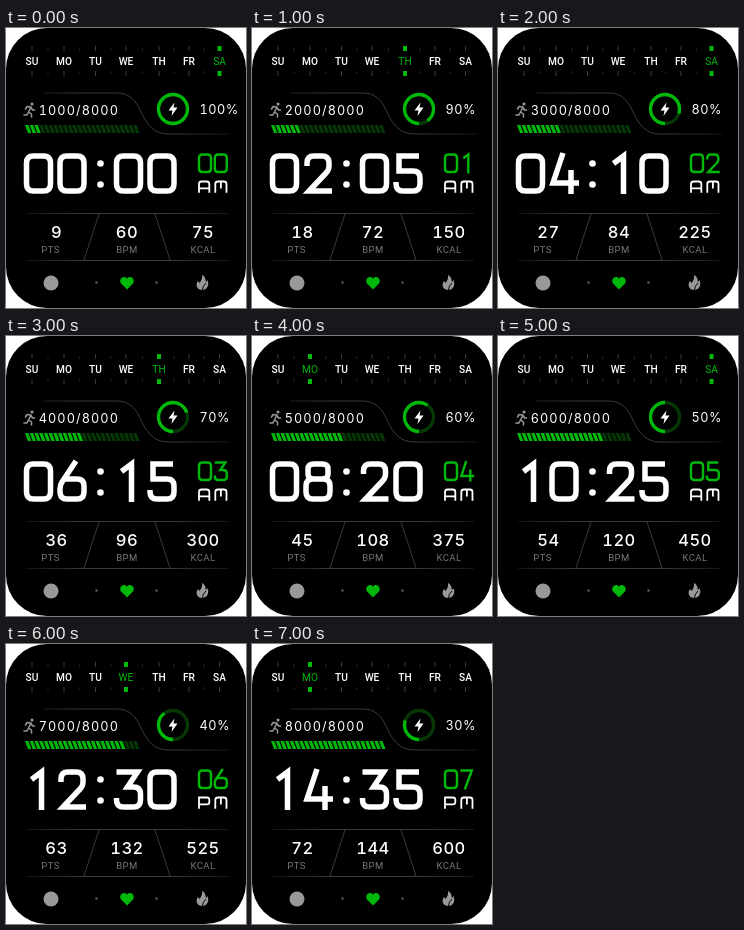
An HTML page that plays this animation: 240 px wide and 280 px high, repeating every 8 s.

```html
<!DOCTYPE html>
<html lang="en">
<head>
<meta charset="utf-8">
<title>Watch face</title>
<style>
  html, body { margin: 0; width: 100%; height: 100%; overflow: hidden; background: #fff; }
  svg { display: block; width: 240px; height: 280px; --green: #00b80a; --dim: #063806; }
  text { fill: #fff; font: 500 10.2px Roboto, sans-serif; }
  .mid text { text-anchor: middle; }
  .value text { font: 500 16.5px Inter, sans-serif; font-variant-numeric: tabular-nums; letter-spacing: .5px; }
  .small { font: 400 12.7px Inter, sans-serif; font-variant-numeric: tabular-nums; letter-spacing: 1.1px; }
  .unit text { fill: #777; font-size: 9.5px; font-weight: 400; letter-spacing: .4px; }
  .lines { fill: none; stroke: url(#fade); }
  .glyphs { fill: none; }
  .day rect { fill: #3c3c3c; }
  .day.on * { fill: var(--green); font-weight: 400; }
</style>
</head>
<body>
<svg viewBox="0 0 240 280">
  <defs>
    <linearGradient id="fade" gradientUnits="userSpaceOnUse" x1="18" x2="224" y1="0" y2="0">
      <stop stop-color="#111"/><stop offset=".3" stop-color="#3a3a3a"/>
      <stop offset=".7" stop-color="#3a3a3a"/><stop offset="1" stop-color="#161616"/>
    </linearGradient>
  </defs>
  <rect width="240" height="280" rx="41"/>
  <g id="days" class="mid"></g>

  <g class="lines">
    <path d="M38 65H111C124 65 130 73 135 84S147 106 162 106H224"/>
    <path d="M20 185.500H222M20 232.500H222M93 186L78 232M149 186L164 232"/>
  </g>

  <g fill="none" stroke="#999" stroke-width="1.500" stroke-linecap="round" stroke-linejoin="round">
    <path d="M19.500 81L21 78.500L25 79L22.500 84L25.500 86V89M22.500 84L21 87H18M25 79.500L26.500 82H28.500"/>
    <circle cx="26" cy="76" r=".8" fill="#999"/>
  </g>
  <text id="steps" class="small" x="32.700" y="86.500"></text>
  <g id="bar"></g>

  <g fill="none" stroke-width="3.300" transform="rotate(90 167 81)">
    <circle cx="167" cy="81" r="14.500" stroke="var(--dim)"/>
    <circle id="ring" cx="167" cy="81" r="14.500" stroke="var(--green)" pathLength="100"/>
  </g>
  <path d="M168.500 74.500L162.500 82.500H166.500L165.500 88L171.500 79.500H167.500Z" fill="#fff"/>
  <text id="battery" class="small" x="193.500" y="85.500" style="letter-spacing:.5px"></text>

  <g id="clock" class="glyphs" role="img"></g>
  <g fill="#fff"><circle cx="94.500" cy="135.500" r="3.300"/><circle cx="94.500" cy="156.500" r="3.300"/></g>

  <g class="mid value">
    <text id="score" x="50.500" y="210"></text>
    <text id="pulse" x="121" y="210"></text>
    <text id="energy" x="197" y="210"></text>
  </g>
  <g class="mid unit">
    <text x="44.500" y="225">PTS</text>
    <text x="121" y="225">BPM</text>
    <text x="197" y="225">KCAL</text>
  </g>

  <g fill="#999">
    <circle cx="45" cy="255" r="7.500"/>
    <circle cx="90.500" cy="254.500" r="1.200" opacity=".6"/>
    <circle cx="150.500" cy="254.500" r="1.200" opacity=".6"/>
    <path d="M196 247C201 250 199 253 200 254L201.500 252C204 258 200 262 196.500 262C191 262 189 257 192 253L193.500 255C195 253 196.500 251 196 247Z"/>
    <path d="M196.500 262Q196.500 258 200 255" fill="none" stroke="#000"/>
  </g>
  <path d="M121 261.500L114.800 255.200C112.500 251.500 117.500 246.500 121 250.700C124.500 246.500 129.500 251.500 127.200 255.200Z" fill="var(--green)"/>
</svg>
<script>
const $ = id => document.getElementById(id);
const pad = n => String(n).padStart(2, "0");

// Centre lines of the clock characters in a 24 by 35 box
const bowl = "17 15Q24 15 24 22V28Q24 35 17 35H7Q0 35 0 28";
const glyphs = {
  0: "M7 0H17Q24 0 24 7V28Q24 35 17 35H7Q0 35 0 28V7Q0 0 7 0Z",
  1: "M5 7.500L15 0V38",
  2: "M1 10V7Q1 0 8 0H16Q23 0 23 7V10Q23 14 20 17L3 35H26",
  3: "M0 0H21L11 15L" + bowl + "V26",
  4: "M11 -3L1 27H27M19 14V38",
  5: "M23 0H3V15L" + bowl + "V26",
  6: "M16 -3L2 18Q0 21 0 25V28Q0 35 7 35H17Q24 35 24 28V22Q24 15 17 15H5",
  7: "M-1 0H22L8 38",
  8: "M8 0H16Q22 0 22 5V10Q22 15 16 15H8Q2 15 2 10V5Q2 0 8 0ZM7 15L" + bowl + "V22Q0 15 7 15Z",
  A: "M0 26V6Q0 0 6 0H18Q24 0 24 6V26M0 16H24",
  P: "M0 26V0H18Q24 0 24 5V11Q24 16 18 16H0",
  M: "M0 26V6Q0 0 6 0H20Q26 0 26 6V26M13 0V16"
};
const write = (text, x, y, scale, step, weight, color = "#fff") => [...text].map((c, i) =>
  `<path d="${glyphs[c]}" transform="translate(${x + i * step} ${y}) scale(${scale})"
    stroke="${color}" stroke-width="${weight / scale}"/>`).join("");

const dayX = [26, 58, 89.5, 120, 153, 183, 213.5];
const tick = (x, y, w, h) => `<rect x="${x - w / 2}" y="${y}" width="${w}" height="${h}"/>`;
const drawDays = today => ["SU", "MO", "TU", "WE", "TH", "FR", "SA"].map((name, i) => {
  const x = dayX[i], on = i === today, w = on ? 4 : 1;
  const between = i < 6 ? (x + dayX[i + 1]) / 2 : 0;
  return `<g class="day ${on ? "on" : ""}">${tick(x, 18, w, 5)}${tick(x, 43, w, 5)}
    <text x="${x}" y="36.700">${name}</text></g>` +
    (between ? `<g fill="#242424">${tick(between, 20, 1, 3)}${tick(between, 43, 1, 3)}</g>` : "");
}).join("");

const drawBar = lit => Array.from({ length: 24 }, (_, i) =>
  `<path d="M${19 + i * 4.7} 97h3.400l3 8h-3.400Z" fill="var(--${i < lit ? "green" : "dim"})"/>`).join("");

let shown = -1;
function show(n) {
  const hour = pad(n * 2), minute = pad(n * 5), half = n < 6 ? "AM" : "PM";
  // Each second moves on one month and two days
  $("days").innerHTML = drawDays(new Date(2022, n, 1 + 2 * n).getDay());
  $("steps").textContent = `${(n + 1) * 1000}/8000`;
  $("bar").innerHTML = drawBar((n + 1) * 3);
  $("battery").textContent = `${100 - n * 10}%`;
  $("ring").setAttribute("stroke-dasharray", `${100 - n * 10} 100`);
  $("clock").setAttribute("aria-label", `${hour}:${minute}:${pad(n)} ${half}`);
  $("clock").innerHTML = write(hour, 20.5, 128, 1, 33.5, 5.5) + write(minute, 110.5, 128, 1, 33.5, 5.5) +
    write(pad(n), 193, 126.5, .5, 15.8, 2.4, "var(--green)") + write(half, 193, 153.5, .43, 16.3, 1.8);
  $("score").textContent = (n + 1) * 9;
  $("pulse").textContent = 60 + n * 12;
  $("energy").textContent = (n + 1) * 75;
}
function frame() {
  const n = Math.floor(performance.now() / 1000) % 8;
  if (n !== shown) show(shown = n);
  requestAnimationFrame(frame);
}
frame();
</script>
</body>
</html>
```
